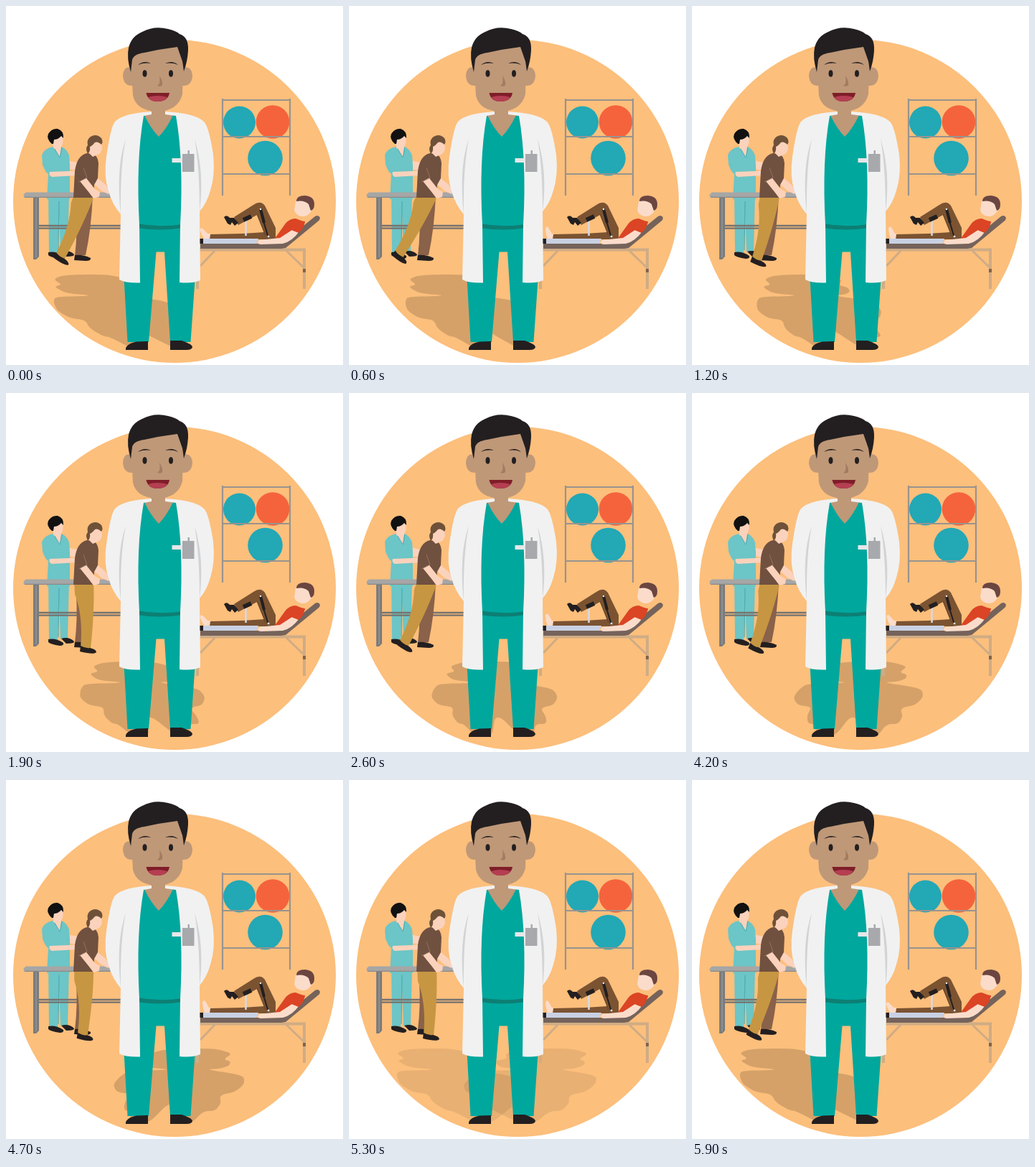
These frames come from a looping animation (470 px wide and 500 px high, 6000 ms). An HTML page with a canvas:

```html
<!DOCTYPE html>
<html lang="en">
<head>
<meta charset="utf-8">
<title>Physiotherapy room</title>
<style>
html, body { margin: 0; width: 100%; height: 100%; overflow: hidden; background: #fff; }
canvas { display: block; }
</style>
</head>
<body>
<canvas id="stage" width="470" height="500"></canvas>
<script>
const ctx = document.getElementById('stage').getContext('2d');
const LOOP = 6;
const SKIN = '#fbd2bc', BLACK = '#231f20', GREEN = '#00a79d', COAT = '#f1f1f1', FACE = '#bf9878';

function fill(color, d) {
  ctx.fillStyle = color;
  ctx.fill(new Path2D(d));
}
function line(color, width, d) {
  ctx.strokeStyle = color;
  ctx.lineWidth = width;
  ctx.stroke(new Path2D(d));
}
function oval(color, x, y, rx, ry = rx) {
  ctx.fillStyle = color;
  ctx.beginPath();
  ctx.ellipse(x, y, rx, ry, 0, 0, Math.PI * 2);
  ctx.fill();
}
function turned(x, y, degrees, draw) {
  ctx.save();
  ctx.translate(x, y);
  ctx.rotate(degrees * Math.PI / 180);
  ctx.translate(-x, -y);
  draw();
  ctx.restore();
}
const clamp01 = v => Math.max(0, Math.min(1, v));

// Smooth interpolation through [time, value] stops.
function track(stops, t) {
  let i = 0;
  while (i < stops.length - 2 && t >= stops[i + 1][0]) i++;
  const slope = k => {
    const a = stops[Math.max(0, k - 1)], b = stops[Math.min(stops.length - 1, k + 1)];
    return (b[1] - a[1]) / (b[0] - a[0]);
  };
  const [t0, v0] = stops[i], [t1, v1] = stops[i + 1];
  const d = t1 - t0, u = (t - t0) / d, w = 1 - u;
  return w * w * (1 + 2 * u) * v0 + u * u * (3 - 2 * u) * v1 + d * u * w * (w * slope(i) - u * slope(i + 1));
}

// Left edge of the swinging shoe.
const STEP = [[0, 65], [.3, 61], [.7, 59], [1.2, 81], [1.5, 96], [1.9, 103], [2.2, 88], [2.6, 66],
  [3.3, 60], [3.6, 59], [4.2, 78], [4.5, 93], [4.9, 102], [5.3, 103], [5.6, 92], [5.9, 75], [6, 65]];

// Shadow outline when it stands upright.
const SHADOW = [[200, 374], [175, 376], [161, 381], [167, 388], [152, 391], [162, 400], [194, 403], [186, 404],
  [141, 405], [132, 412], [126, 424], [135, 435], [155, 437], [151, 449], [156, 460], [164, 461], [176, 478],
  [200, 478], [210, 452], [220, 452], [238, 478], [258, 478], [265, 461], [281, 461], [283, 450], [278, 441],
  [283, 437], [296, 435], [305, 424], [301, 413], [285, 409], [245, 403], [264, 402], [275, 398], [275, 392],
  [264, 389], [273, 381], [255, 376], [242, 374]];

function shadow(t, alpha) {
  if (alpha <= 0) return;
  const dt = t - 3.3;
  const points = SHADOW.map(([x, y]) => {
    const speed = Math.min(.268 * (491 - y), .393 * (478 - y));
    return [x + (x - 214) * .015 * dt + speed * dt, y];
  });
  const n = points.length;
  const toward = (a, b) => [a[0] + (b[0] - a[0]) * .4, a[1] + (b[1] - a[1]) * .4];
  ctx.fillStyle = `rgba(0,0,0,${.155 * alpha})`;
  ctx.beginPath();
  points.forEach((p, i) => {
    ctx.lineTo(...toward(p, points[(i + n - 1) % n]));
    ctx.quadraticCurveTo(...p, ...toward(p, points[(i + 1) % n]));
  });
  ctx.closePath();
  ctx.fill();
}

function shelf() {
  oval('#23a8b5', 325.5, 162, 22.5);
  oval('#f5633d', 372, 161.5, 23.3);
  oval('#23a8b5', 361.5, 212, 24.3);
  line('#98938f', 2.2, 'M302 129V264M396 129V264M301 131H397M301 182H397M301 234H397');
}

function therapist() {
  fill(SKIN, 'M86 215L99 218L101 229L86 227Z');
  fill('#6cc5c6', 'M59 262H88L86 342H76L74 290L72 344H60Z');
  line('#4eabb0', 1.2, 'M74 272L73 340');
  fill(BLACK, 'M59 343Q69 341 80 348Q81 352 75 352Q62 350 59 347Z');
  fill(BLACK, 'M77 342Q88 339 95 346Q96 349 84 349Z');
  fill('#6cc5c6', 'M66 196Q53 198 50 208L51 221Q55 232 59 234L57 269H89V222L88 208Q84 198 77 196Z');
  fill(SKIN, 'M66 195L75 211L77 196Z');
  line('#4eabb0', 1, 'M66 196L75 211L78 197');
  fill(SKIN, 'M61 231L88 230L101 229Q104 234 99 236L64 238Q59 236 61 231Z');
  fill(SKIN, 'M65 181L79 180Q81 193 76 197L75 202L66 198Z');
  fill('#111', 'M64 192Q56 185 59 178Q64 170 72 171Q81 174 80 184L77 181Q73 186 67 186L66 192Z');
}

function table() {
  line('#77736f', 2.4, 'M44 306H160M44 309.6H160');
  fill('#7b7b7b', 'M38 266H46V349L42 353H38Z');
  line('#a2a2a2', 1, 'M42 268V350');
  fill('#a6a6a5', 'M28 259.5H160V267H26Q22 263 28 259.5Z');
  line('#8a8988', 1.2, 'M26 266.4H160');
}

function patient(angle) {
  fill('#8a6149', 'M100 264H121Q119 310 111 347L96 348Q100 315 98 280Z');
  fill(BLACK, 'M96 347Q107 346 118 351Q119 355 111 355L95 354Z');
  turned(108, 264, angle, () => {
    fill('#c79642', 'M95 260H122Q124 300 118 356L104 354Q108 312 96 280Z');
    fill(BLACK, 'M104 352Q111 356 117 355Q126 357 126 361Q123 365 103 360Z');
  });
  fill(SKIN, 'M120 233L139 249L145 258L143 262L134 258L118 244Z');
  fill('#70503f', 'M113 205Q99 208 96 230L94 267H122L123 249L128 240L129 219Q128 208 121 206Z');
  fill(SKIN, 'M99 239L109 236L124 255L131 259L130 266L122 268L116 260Z');
  fill('#70503f', 'M98 230L108 225L113 239L100 246Z');
  line('#9a7b6b', .8, 'M108 225L113 239L101 245');
  fill(SKIN, 'M118 189L133 188L134 198Q133 205 128 207L121 210L116 205Z');
  fill('#6e5138', 'M114 206Q110 198 114 194Q112 186 118 182Q126 177 133 184Q136 189 133 193Q128 188 124 190Q120 195 117 196Q118 202 114 206Z');
}

function bench() {
  line('#cfac85', 3, 'M291 341L271 362M391 341L416 365');
  line('#cfac85', 4, 'M268 339.5H418M267 340V394M416 338V394');
  fill('#80644e', 'M414 366H418V371H414Z');
  fill('#75635b', 'M271 331H384L431 293Q436 290 438 295Q438 298 435 300L390 337L384 338H271Z');
}

function recliner(lean) {
  turned(282, 323, -17 * lean, () =>
    fill('#fbdccb', 'M286 318L283 317L278 308Q275 306 274 310L275 318L277 324H286Z'));
  fill('#7b5331', 'M285 318L330 317L376 314V325H284Z');
  fill('#7b5331', 'M376 309L361 278Q355 270 345 277L318 294L324 305L350 291L362 320L376 325Z');
  line('#624127', 1, 'M350 290L362 320');
  fill('#c9d1e3', 'M275 324H352L349 331H275Z');
  fill(BLACK, 'M270 324H275V331H270Z');
  fill(BLACK, 'M304 294Q308 290 312 295L318 295L324 302L319 306L315 301L313 305L309 303Z');
  line('#d6dae6', 2.5, 'M334.5 299V320');
  line(BLACK, 6, 'M331 298L342 293');
  line(BLACK, 4, 'M355 283L360 302');
  line(BLACK, 2, 'M358 296L366 323');
  oval('#e7e7e7', 355, 283, 1.3);
  oval('#e7e7e7', 366, 321, 1.5);
  fill('#db4424', 'M374 325L389 304Q395 296 404 296L417 301Q410 318 394 326Z');
  fill('#fbdccb', 'M402 310L409 314Q399 328 386 331L355 332Q348 331 353 326L382 323Z');
  fill('#db4424', 'M400 298L417 300Q415 311 408 316L398 312Z');
  fill('#fbdccb', 'M404 272Q413 265 424 272L427 284Q421 294 413 293Q404 292 402 284Z');
  fill('#6b4540', 'M405 272Q405 264 417 264Q430 265 430 276Q430 284 425 285L422 276Q416 270 405 272Z');
}

function doctor() {
  fill(GREEN, 'M164 370L169.5 468H199L209.5 342.5H221L229 468H257.5L264 375L244 290H184Z');
  fill(BLACK, 'M167 479Q166 471 182 467.5L198 467V479Z');
  fill(BLACK, 'M229 466H245Q260 471 260 475Q259 479 252 479H229Z');
  fill(GREEN, 'M188 151H240L252 200V312H178V200Z');
  fill('#0d7f74', 'M183 303Q214 309 246 304V309Q214 314 183 309Z');
  fill(FACE, 'M202 140H222V149L233 152Q224 171 213 182Q202 171 193 152L202 149Z');
  fill(COAT, 'M203 147Q164 149 152 161Q146 168 140 210Q136 237 143 258Q148 276 160 290L158 381Q166 386 187 385.5L186 305Q181 215 192 153L203 151Z');
  fill(COAT, 'M222 147Q263 149 276 161Q283 168 289 207Q292 235 285 257Q280 275 270 286L271 382Q260 387 242 385L243 305Q248 215 237 153L222 151Z');
  fill('#d1d3d4', 'M167 185Q153 225 160 290Q159 225 167 185ZM263 185Q277 230 270 286Q270 225 263 185Z');
  fill('#e6e7e8', 'M231.5 212H246V218H231.5Z');
  fill('#a7a9ac', 'M246 206H262.5V231H246ZM253.5 201H256V207H253.5Z');

  fill(FACE, 'M176 86Q164 82 163 97Q164 112 177 111ZM246 86Q259 82 260 97Q259 112 246 111Z');
  fill(FACE, 'M175 70Q205 50 244 56L247 85L246 123Q240 146 211 147Q182 146 177 125L175 88Z');
  fill(BLACK, 'M174 92Q168 72 171 58Q175 42 190 36Q207 27 226 32Q238 35 242 39Q255 43 254 62Q253 78 248 91L246 77L239 57Q215 60 193 65Q178 67 176 75Z');
  fill(BLACK, 'M184 82Q193 75 202 80Q193 78.5 184 82ZM222 80Q232 75 240 82Q232 78.5 222 80Z');
  oval(BLACK, 193.5, 94, 3, 4.7);
  oval(BLACK, 230, 94, 3, 4.7);
  fill('#a27b60', 'M214 97Q219 105 218 110Q216 113 211 111Q216 109 214 97Z');
  fill('#7f1d28', 'M195.5 121H228Q226 133 211 133Q198 133 195.5 121Z');
  fill('#b53f52', 'M198 127Q211 123 225 127Q221 133 211 133Q202 133 198 127Z');
}

function draw(t) {
  ctx.fillStyle = '#fff';
  ctx.fillRect(0, 0, 470, 500);
  oval('#fcbf7c', 235, 272, 225);
  const fade = clamp01((t - 5) / .6);
  shadow(t, 1 - fade);
  shadow(0, fade);
  shelf();
  therapist();
  table();
  patient((103 - track(STEP, t)) * .6);
  bench();
  recliner((.5 + .5 * Math.cos(Math.PI * t)) ** 3);
  doctor();
}

function frame() {
  const t = performance.now() / 1000 % LOOP;
  draw(Math.floor(t * 10) / 10);
  requestAnimationFrame(frame);
}
frame();
</script>
</body>
</html>
```
